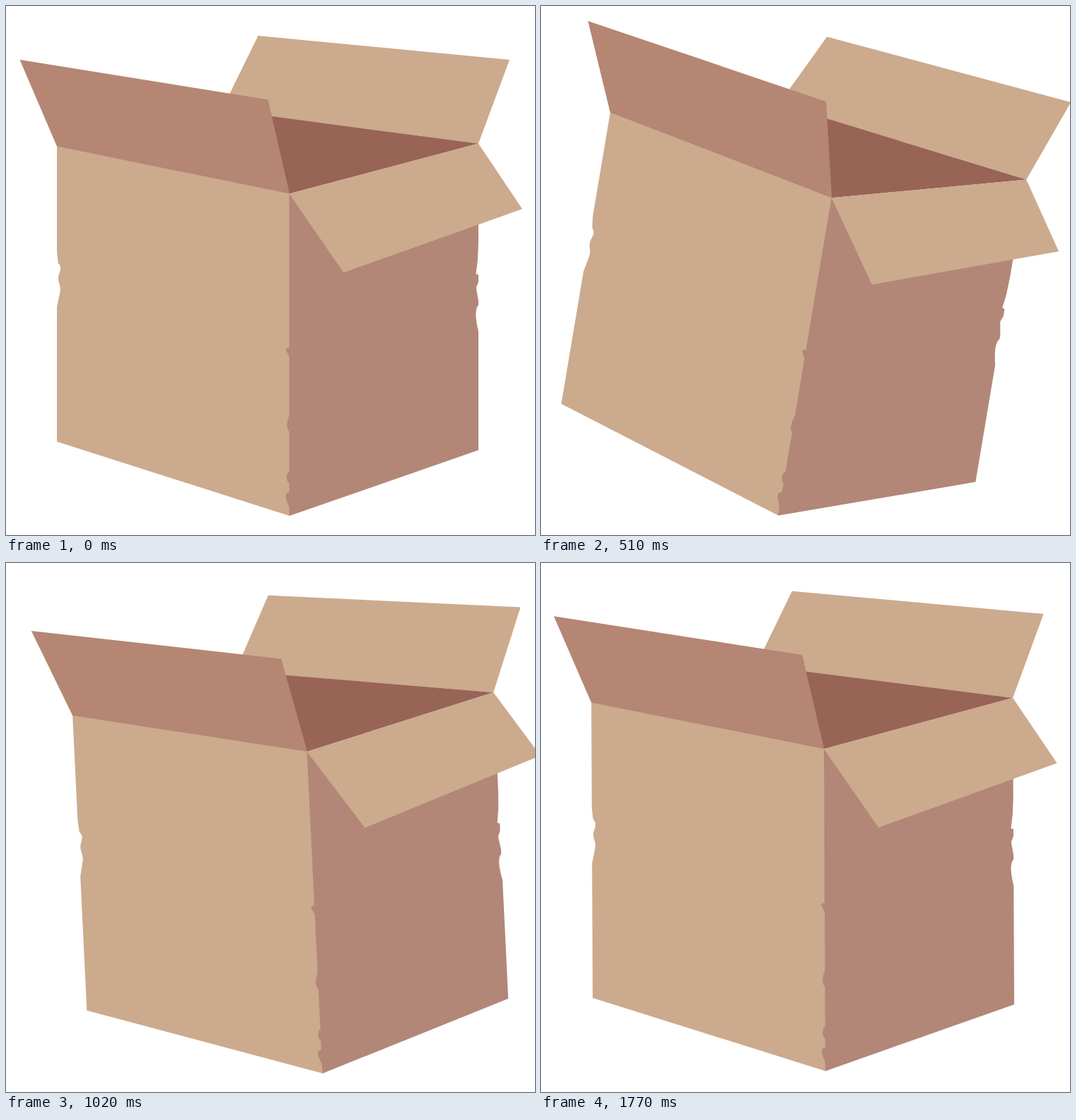
An HTML page that plays this animation: 748 px wide and 748 px high, repeating every 1800 ms.

```html
<!DOCTYPE html>
<html lang="en">
<head>
<meta charset="utf-8">
<title>Rocking box</title>
<style>
html, body { margin: 0; width: 100%; height: 100%; overflow: hidden; background: #fff; }
svg { display: block; width: 100%; height: 100%; }
</style>
</head>
<body>
<svg viewBox="0 0 748 748">
  <g id="box">
    <path fill="#ccaa8d" d="M356.5 42 712 76 668 194.5 305 147Z"/>
    <path fill="#986455" d="M305 146.6 668 194.5 400.5 265.5Z"/>
    <path fill="#ccaa8d" d="M72 198.3 401 265V721L72 616V426L76.3 405Q77.5 399 75.5 393 72.5 385 75.5 378 78.5 370 76 366.5L73.7 363 72 347Z"/>
    <path fill="#b28777" d="M400.5 265.5 668 300V335L667 359 664.5 379 668 380V390L664.8 398.5 668 417V423Q664.5 426 664.3 436 664.5 446 668 460V628L400.5 721V709L396 697Q394.5 691 397 689L400.5 687V675Q397 672 397 667 397 660 400.5 658V602Q397.5 599 397.2 593 397.5 586 400.5 578V496L395.3 485.5 400.5 482.5Z"/>
    <path fill="#b58673" d="M19.5 76 370.5 132.5 401 265.5 72 198.5Z"/>
    <path fill="#ccaa8d" d="M400.5 265.5 668 194.5 730 287 477.3 377Z"/>
  </g>
</svg>
<script>
const LOOP = 1800, STEP = 30;
const box = document.getElementById("box");

// Key poses: time, tilt, and the place of the box's lowest corner.
const poses = [
  [0, 0, 400.5, 721],
  [240, 11.3, 306, 720.5],
  [390, 11.56, 310, 719.5],
  [630, 6.62, 367.5, 721.8],
  [1020, -2.77, 447.5, 721.8],
  [1230, -6.74, 460.5, 721.3],
  [1500, -5.16, 441, 720.6],
  [LOOP, -0.15, 401.2, 718.4]
];

// Slope of the parabola through a pose and its neighbours; at rest at both ends.
function slope(i, part) {
  if (i === 0 || i === poses.length - 1) return 0;
  const [a, b, c] = poses.slice(i - 1, i + 2);
  const h = b[0] - a[0], k = c[0] - b[0];
  return ((b[part] - a[part]) / h * k + (c[part] - b[part]) / k * h) / (h + k);
}

function poseAt(t) {
  const i = poses.findIndex(p => p[0] > t) - 1;
  const a = poses[i], b = poses[i + 1];
  const span = b[0] - a[0], u = (t - a[0]) / span, w = 1 - u;
  return [1, 2, 3].map(part =>
    w * w * ((1 + 2 * u) * a[part] + u * span * slope(i, part)) +
    u * u * ((1 + 2 * w) * b[part] - w * span * slope(i + 1, part)));
}

const start = performance.now();
function draw(now) {
  const t = Math.floor(Math.max(0, now - start) % LOOP / STEP) * STEP;
  const [tilt, x, y] = poseAt(t);
  box.setAttribute("transform", `translate(${x} ${y}) rotate(${tilt}) translate(-400.5 -721)`);
  requestAnimationFrame(draw);
}
draw(start);
</script>
</body>
</html>
```
